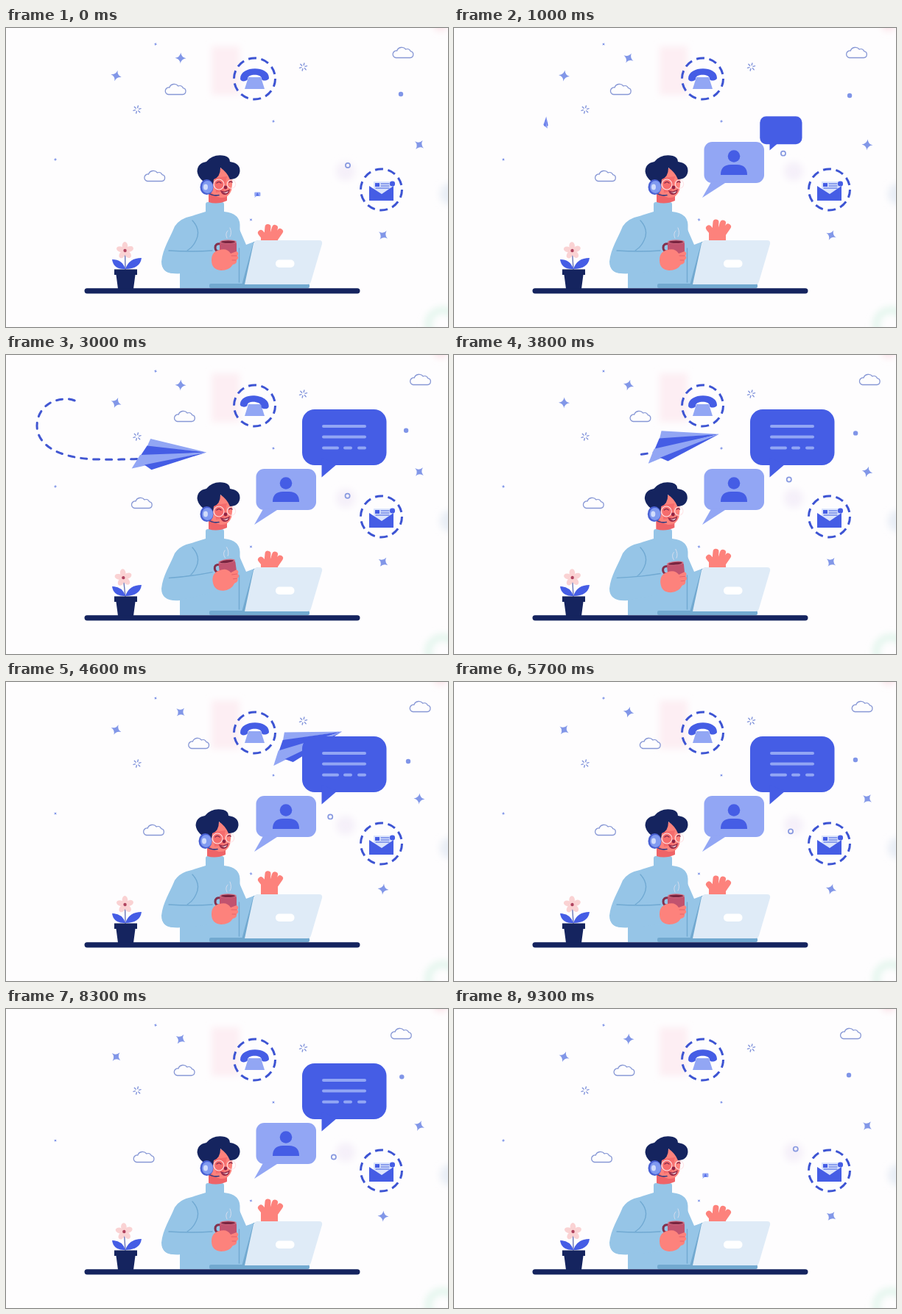
An HTML page that plays this animation: 600x407 px, repeating every 9400 ms.

```html
<!DOCTYPE html>
<html lang="en">
<head>
<meta charset="utf-8">
<title>Support desk</title>
<style>
  html, body { margin: 0; width: 100%; height: 100%; overflow: hidden; background: #fefdfe; }
  svg { display: block; width: 100vw; height: 100vh; }
  .navy { fill: #15245f; } .blue { fill: #455de5; } .sky { fill: #92a6f4; }
  .skin { fill: #fd827c; } .knit { fill: #96c5e7; } .shade { fill: #72a9d0; }
  .line { fill: none; stroke-linecap: round; stroke-linejoin: round; }
  .ring { fill: none; stroke: #3d54d3; stroke-width: 3; stroke-dasharray: 11 6.6; }
  .fold { stroke: #70a9d2; stroke-width: 1.4; }
</style>
</head>
<body>
<svg viewBox="0 0 600 407">
  <defs>
    <filter id="blur" x="-50%" y="-50%" width="200%" height="200%"><feGaussianBlur stdDeviation="5"/></filter>
    <path id="star" fill="#8297e8" d="M0-7.5Q1-1 7.5 0Q1 1 0 7.5Q-1 1-7.5 0Q-1-1 0-7.5Z"/>
    <path id="cloud" fill="#fefdfe" stroke="#8797d5" stroke-width="1.3" d="M-9.5 7.5H10A4.5 4.5 0 0 0 10.5-1.4A5 5 0 0 0 4-4A7 7 0 0 0-8-2A4.8 4.8 0 0 0-9.5 7.5Z"/>
    <g id="spark" class="line" stroke="#8294db" stroke-width="1.4"></g>
    <path id="route" d="M131 188C124 165 127 140 125 118C122 80 100 58 80 60C55 61 42 78 42 97C43 125 75 140 120 142C180 143 230 140 275 132C345 118 400 92 455 68C520 38 580 5 1000-190"/>
  </defs>

  <g filter="url(#blur)">
    <rect x="279" y="25" width="38" height="66" fill="#fdeef3"/>
    <circle cx="461" cy="195" r="13" fill="#f5f0f9"/>
    <circle cx="604" cy="226" r="15" fill="#e9eef6"/>
    <circle cx="590" cy="-6" r="10" fill="#fbe3e8"/>
    <circle cx="593" cy="404" r="20" fill="none" stroke="#e2f5ec" stroke-width="9"/>
  </g>

  <g id="sky"></g>
  <path id="trail" class="line" stroke="#4257d2" stroke-width="3"/>
  <circle id="dot" r="3.2" fill="#8095e8"/>
  <circle id="bead" r="3.1" fill="none" stroke="#8799e0" stroke-width="1.7"/>
  <g id="plane">
    <path class="sky" d="M0 0L-79-20L-84-9Z"/>
    <path class="blue" d="M0 0L-84-10L-94 5Z"/>
    <path class="sky" d="M0 0L-94 3L-106 22Z"/>
    <path class="blue" d="M0 0L-88 17L-78 24Z"/>
  </g>

  <circle class="ring" cx="337.5" cy="69" r="28"/>
  <path class="sky" d="M329 67H346L351 83H324Z"/>
  <path id="handset" class="blue" d="M318 69C318 51 357 51 357 68C357 72 347 73 347 69C347 62 328 62 328 69C328 73 318 74 318 69Z"/>

  <circle class="ring" cx="509.5" cy="220" r="28"/>
  <rect x="499" y="209" width="24" height="18" fill="#dbe4fc"/>
  <path class="line" d="M509 212H520M509 215H520M502 218H520" stroke="#7086e8" stroke-width="1.3"/>
  <path class="blue" d="M501 211H507V216H501ZM493 215L510 226L526 215V235H493Z"/>
  <rect class="blue" x="521" y="208.500" width="7" height="7" rx="3"/>

  <g id="big">
    <rect class="blue" x="402" y="74" width="114.500" height="76" rx="17"/>
    <path class="blue" d="M428.500 140V166.500L450 148Z"/>
    <g id="message" class="line" stroke="#92a6f4" stroke-width="4"></g>
  </g>
  <g id="small">
    <rect class="sky" x="339.500" y="155" width="81.500" height="56" rx="11"/>
    <path class="sky" d="M350 208L337 231L371 209Z"/>
    <circle class="blue" cx="380" cy="174.500" r="8.300"/>
    <path class="blue" d="M362 200Q362 186 376 186H384Q398 186 398 200Z"/>
  </g>

  <g id="flower">
    <path class="line" d="M162 329V306" stroke="#6875b8" stroke-width="1.4"/>
    <g id="petals" fill="#fad2d3"></g>
    <circle cx="162" cy="303" r="2.200" fill="#b0435f"/>
  </g>
  <path class="blue" d="M162 328Q146 329 144 315Q158 315 162 328Q167 313 184 313Q182 328 162 328Z"/>
  <path class="navy" d="M147 328.500H178V336H175.500L173 355H152L149.500 336H147Z"/>

  <path class="knit" d="M316 272L326 295L342 289L324 352H310Z"/>
  <path class="knit" d="M271 240Q271 237 274 237H293Q296 237 296 240V250Q317 252 317.500 268V354H236V334Q211 336 211 318C213 300 222 287 229 270Q236 259 252 256L271 250Z"/>
  <path class="line fold" d="M253 262Q265 275 258 289Q254 298 246 303M316.500 300V346"/>

  <g id="head">
    <path fill="#ef6468" d="M275 214H300V235Q287 241 275 237Z"/>
    <path class="skin" d="M277 197Q288 186 305 194Q309 205 306 221Q302 232 291 231Q279 229 275 216Z"/>
    <path fill="#f56c6d" d="M283 204L300 202L296 222L285 224Z"/>
    <path class="navy" d="M276 213Q261 207 259.500 195Q260 184 272 182Q281 171 297 174Q304 176 304 182Q318 184 317.500 195Q316 206 304 206Q300 196 291 190Q291 203 282 206L281 214Z"/>
    <g class="line" stroke="#ffe3e6" stroke-width="1.1">
      <circle cx="289" cy="213" r="7"/><circle cx="306" cy="212.500" r="5.700"/>
    </g>
    <path class="line" d="M286 211Q289 208 292 211M303 210Q305 208 307 210" stroke="#8a2c4b" stroke-width="1.5"/>
    <circle cx="298" cy="217" r="2.400" fill="#8f2444"/>
    <path d="M291 221Q298 224 304 219Q303 228 296 227Q292 226 291 221Z" fill="#9b2f4c"/>
    <path d="M294 223Q298 225 302 222Q300 227 294 223Z" fill="#fff"/>
    <path class="line" d="M274 224Q280 229 289 227.500" stroke="#313e82" stroke-width="1.6"/>
    <ellipse cx="272.500" cy="216.500" rx="9" ry="10.500" fill="#4961d4"/>
    <ellipse cx="273.500" cy="216.500" rx="7.500" ry="8.500" fill="#809af0"/>
    <ellipse cx="271" cy="216.500" rx="3" ry="4" fill="#d1dcfb"/>
  </g>

  <g id="arm">
    <path class="knit" d="M222 303H280L284 328Q258 335 226 334Q211 333 212 318Q214 306 222 303Z"/>
    <path class="line fold" d="M221 303Q250 305 280 303"/>
    <path class="line" d="M291 294Q284 293 284 299T291 304" stroke="#83304d" stroke-width="3"/>
    <rect x="290" y="291" width="23" height="20" rx="3" fill="#c1536f"/>
    <ellipse cx="301.500" cy="291" rx="11.500" ry="2.800" fill="#d27286"/>
    <ellipse cx="301.500" cy="291.300" rx="9.500" ry="1.800" fill="#792440"/>
    <path class="line" d="M300 286Q297 280 301 276M304 284Q307 279 304 272" stroke="#eee6f0" stroke-width=".7"/>
    <path class="skin" d="M279 316Q279 304 290 302Q300 299 305 307L313 304Q317 306 314 310Q317 313 313 316Q314 321 308 322Q303 330 292 330Q279 329 279 316Z"/>
    <path class="line" d="M306 310H313M307 316H312" stroke="#e5636a"/>
  </g>

  <g id="hand" class="line" stroke="#fd827c" stroke-width="8">
    <path d="M354 288L346 278M354 286L355.500 270M360 287L365 271M363 289L372 276"/>
    <rect class="skin" x="350" y="281" width="15" height="24" rx="4"/>
  </g>

  <path class="shade" d="M336 291H342L330 350H320Z"/>
  <rect class="shade" x="276" y="348" width="136" height="6" rx="2"/>
  <path d="M342 289H425Q430 289 429 294L414 345Q413 349 409 349H324L336 293Q338 289 342 289Z" fill="#dfebf7"/>
  <rect x="366" y="315.500" width="25.500" height="10.500" rx="5" fill="#fff"/>
  <rect class="navy" x="106.500" y="354.200" width="374" height="7.200" rx="3.600"/>
</svg>
<script>
const $ = id => document.getElementById(id);
const LOOP = 9.4, STEP = .1, TAU = 2 * Math.PI;
const ramp = (t, a, b) => Math.max(0, Math.min(1, (t - a) / (b - a)));
const ease = x => x * x * (3 - 2 * x);
const pulse = (t, a, b) => Math.sin(Math.PI * ramp(t, a, b));
// Whole cycles per loop, so every drift closes on itself
const wave = (t, cycles, phase = 0) => Math.cos(TAU * (cycles * t / LOOP - phase));

function add(parent, tag, attrs) {
  const node = document.createElementNS("http://www.w3.org/2000/svg", tag);
  for (const key in attrs) node.setAttribute(key, attrs[key]);
  return parent.appendChild(node);
}
const use = name => add($("sky"), "use", { href: "#" + name });
const move = (node, transform) => node.setAttribute("transform", transform);
const show = (node, on) => node.style.display = on ? "" : "none";

for (let a = 15; a < 360; a += 60) add($("spark"), "path", { d: "M0-2.6V-5.2", transform: `rotate(${a})` });
for (let a = 0; a < 360; a += 72)
  add($("petals"), "ellipse", { cx: 162, cy: 296.5, rx: 3.8, ry: 5.4, transform: `rotate(${a} 162 303)` });
for (const [x, y] of [[403.5, 53], [178, 111]]) move(use("spark"), `translate(${x} ${y})`);

const clouds = [
  { x: 246, y: 83, reach: 20, cycles: 1, phase: .6 },
  { x: 195, y: 201, reach: 11, cycles: 2, phase: .15 },
  { x: 550, y: 33, reach: 14, cycles: 1, phase: .4 }
].map(c => ({ ...c, node: use("cloud") }));

const bigStars = [[237, 41], [149.5, 65], [561, 159], [512, 282]];
const tinyStars = [[203, 22], [67, 179], [363, 127], [332.5, 261]];
const stars = [...bigStars, ...tinyStars].map(([x, y], i) => ({ x, y, size: i < 4 ? 1 : .3, node: use("star") }));

const message = [[431, 97, 56], [431, 111.5, 56], [431, 126.5, 19], [460, 126.5, 8], [479, 126.5, 8]]
  .map(([x, y, length]) => ({ x, length, node: add($("message"), "line", { x1: x, y1: y, y2: y }) }));

const at = s => $("route").getPointAtLength(Math.max(0, s));

function drawPlane(t) {
  const flying = t > .9 && t < 5.7;
  show($("plane"), flying);
  show($("trail"), flying);
  if (!flying) return;
  // A quick loop, a steady glide, then a fast exit
  const loop = 1 - (1 - ramp(t, .9, 1.8)) ** 2;
  const nose = 316 * loop + 48 * (t - .9) ** 1.5 + 400 * ramp(t, 4.6, 5.6) ** 2;
  const p = at(nose), q = at(nose - 6);
  const angle = Math.atan2(p.y - q.y, p.x - q.x) * 360 / TAU + 9;
  move($("plane"), `translate(${p.x} ${p.y}) rotate(${angle}) scale(${.96 * ease(ramp(t, .9, 1.3))})`);

  const tail = 132 * Math.max(0, t - 2) ** 2;
  let d = "";
  for (let s = 2; s + 8 < nose - 80; s += 17) {
    if (s < tail) continue;
    const a = at(s), m = at(s + 4), b = at(s + 8);
    d += `M${a.x} ${a.y}L${m.x} ${m.y}L${b.x} ${b.y}`;
  }
  $("trail").setAttribute("d", d);
}

function pop(id, x, y, size) {
  show($(id), size > 0);
  move($(id), `translate(${x} ${y}) scale(${size}) translate(${-x} ${-y})`);
}

function drawBubbles(t) {
  pop("small", 337, 231, .1 + .9 * (ease(ramp(t, 0, .6)) - ease(ramp(t, 8.7, 9.3))));
  pop("big", 428.5, 166.5, ease(ramp(t, .7, 1.3)) - ease(ramp(t, 8.5, 9.1)));
  message.forEach(({ x, length, node }, i) => {
    const start = 1.63 + i * .27, written = ramp(t, start, start + .27);
    show(node, written > 0);
    node.setAttribute("x2", x + length * written);
  });
}

function draw(t) {
  for (const c of clouds) move(c.node, `translate(${c.x + c.reach * wave(t, c.cycles, c.phase)} ${c.y})`);
  stars.forEach((s, i) =>
    move(s.node, `translate(${s.x} ${s.y}) rotate(${22 + 20 * wave(t, 3, .5 + i * .2)}) scale(${s.size})`));
  move($("dot"), `translate(${541 - 5 * wave(t, 1)} ${99 - 9 * wave(t, 1)})`);
  move($("bead"), `translate(${452 + 12 * wave(t, 3)} ${187 - 18 * wave(t, 3, .25)})`);
  move($("flower"), `rotate(${3 * wave(t, 2) - 4} 162 329)`);
  move($("hand"), `translate(0 ${5 * wave(t, 3, .02) - 4})`);
  move($("handset"), `rotate(${7 * pulse(t, 2.4, 3.6)} 337 66)`);
  move($("arm"), `rotate(${-8 * pulse(t, 2, 4.4)} 225 300)`);
  move($("head"), `translate(${-2 * pulse(t, 3.6, 5.4)} 0)`);
  drawPlane(t);
  drawBubbles(t);
}

function frame() {
  const t = performance.now() / 1000 % LOOP;
  draw(Math.floor(t / STEP) * STEP);
  requestAnimationFrame(frame);
}
frame();
</script>
</body>
</html>
```
